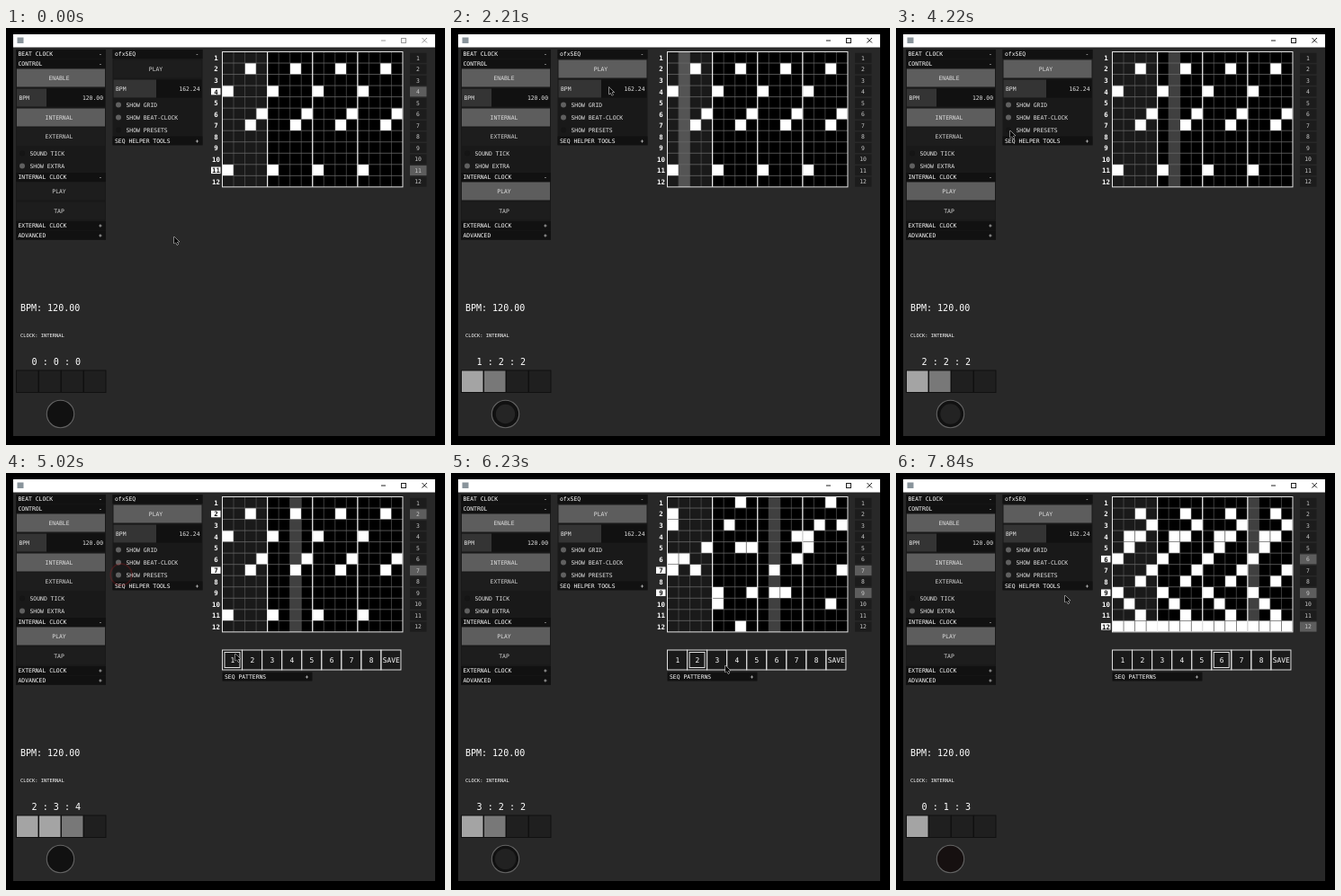
These frames come from a looping animation (488x464 px, 8000 ms). An HTML page with a canvas:

```html
<!DOCTYPE html>
<html lang="en">
<head>
<meta charset="utf-8">
<title>Beat clock sequencer</title>
<style>
html, body { margin: 0; width: 100%; height: 100%; overflow: hidden; background: #000; }
canvas { display: block; }
</style>
</head>
<body>
<canvas id="stage" width="488" height="464"></canvas>
<script>
const ctx = document.getElementById('stage').getContext('2d');
const LOOP = 8000, STEP = 201.03, BEAT = 500;
const START = 1555, PLAY_CLICK = 1500, PRESETS_CLICK = 4500;
const GRID = { x: 240.5, y: 26.5, cell: 12.53, cols: 16, rows: 12 };

// Each row lists its active columns as hexadecimal digits.
const PATTERNS = {
  1: ['', '26ae', '', '048c', '', '37bf', '26ae', '', '', '', '048c', ''],
  2: ['6e', '0', '05df', 'bc', '367c', '01b', '029f', '', '479a', '4e', '', '6'],
  6: ['', '26ae', '37bf', '12569ade', '159d', '048c', '37bf', '26ae', '048c', '159d', '26ae', '0123456789abcdef']
};
const SELECTIONS = [[0, 1], [5500, 2], [6700, 6]];
const CURSOR = [
  [0, 187, 232], [200, 187, 232], [1200, 162, 48], [1600, 161, 45], [1900, 161, 45],
  [3010, 238, 153], [4220, 127, 114], [4550, 127, 113], [5020, 255, 201],
  [5400, 273, 206], [5700, 273, 206], [6230, 305, 214], [6600, 361, 206],
  [6850, 361, 206], [7840, 188, 136], [8000, 188, 136]
];
const CLICKS = [[PLAY_CLICK, 162, 47], [PRESETS_CLICK, 128, 113], [5500, 273, 207], [6700, 361, 207]];

function box(x, y, w, h, fill) {
  ctx.fillStyle = fill;
  ctx.fillRect(x, y, w, h);
}
function frame(x, y, w, h, color, width = 1) {
  ctx.strokeStyle = color;
  ctx.lineWidth = width;
  ctx.strokeRect(x, y, w, h);
}
function line(x1, y1, x2, y2, color, width = 1) {
  ctx.strokeStyle = color;
  ctx.lineWidth = width;
  ctx.beginPath();
  ctx.moveTo(x1, y1);
  ctx.lineTo(x2, y2);
  ctx.stroke();
}
function disc(x, y, r, fill, stroke, width = 1) {
  ctx.beginPath();
  ctx.arc(x, y, r, 0, Math.PI * 2);
  if (fill) { ctx.fillStyle = fill; ctx.fill(); }
  if (stroke) { ctx.strokeStyle = stroke; ctx.lineWidth = width; ctx.stroke(); }
}
function text(label, x, y, { size = 6.4, color = '#e4e4e4', align = 'left', weight = '' } = {}) {
  ctx.font = `${weight} ${size}px "DejaVu Sans Mono", monospace`;
  ctx.fillStyle = color;
  ctx.textAlign = align;
  ctx.textBaseline = 'alphabetic';
  ctx.fillText(label, x, y + size * 0.365);
}

function header(label, x, y, sign, w = 100) {
  box(x, y, w, 10, '#111');
  text(label, x + 2.5, y + 5, { color: '#fff' });
  text(sign, x + w - 6, y + 5, { color: '#fff', align: 'center' });
}
function button(label, x, y, on, w = 98, h = 20) {
  box(x, y, w, h, on ? '#5d5d5d' : '#1d1d1d');
  text(label, x + w / 2 - 2, y + h / 2, { align: 'center', color: on ? '#ddd' : '#d0d0d0' });
}
function slider(value, x, y, fill) {
  box(x, y, 98, 20, '#111');
  box(x, y, fill, 20, '#343434');
  text('BPM', x + 2.5, y + 10);
  text(value, x + 96, y + 10, { align: 'right' });
}
function toggle(label, x, y, on) {
  disc(x, y, 3, on ? '#606060' : '#151515');
  text(label, x + 8.5, y);
}

function drawWindow(focused) {
  box(0, 0, 488, 464, '#000');
  box(8, 7, 469, 447, '#282828');
  box(8, 7, 469, 14.5, '#fff');
  box(12.5, 10.5, 7, 6.5, '#89949b');
  const color = focused ? '#222' : '#999';
  line(417, 14, 422, 14, color);
  frame(439.5, 11.5, 5, 5, color);
  line(462.5, 11, 468, 16.5, color);
  line(468, 11, 462.5, 16.5, color);
}

function drawClockPanel(playing) {
  box(11, 24, 100, 212, '#191919');
  header('BEAT CLOCK', 11, 24, '-');
  header('CONTROL', 11, 34.5, '-');
  button('ENABLE', 12, 45.5, true);
  slider('120.00', 12, 67.5, 33);
  button('INTERNAL', 12, 89.5, true);
  button('EXTERNAL', 12, 111, false);
  toggle('SOUND TICK', 18, 139.5, false);
  toggle('SHOW EXTRA', 18, 153.5, true);
  header('INTERNAL CLOCK', 11, 161, '-');
  button('PLAY', 12, 171.5, playing);
  button('TAP', 12, 193.5, false);
  header('EXTERNAL CLOCK', 11, 215, '+');
  header('ADVANCED', 11, 225.5, '+');
}

function drawSequencerPanel(playing, presets) {
  box(118.5, 24, 100, 106, '#191919');
  header('ofxSEQ', 118.5, 24, '-');
  button('PLAY', 119.5, 35.5, playing);
  slider('162.24', 119.5, 57.5, 47.5);
  toggle('SHOW GRID', 125, 85.5, true);
  toggle('SHOW BEAT-CLOCK', 125, 99.5, true);
  toggle('SHOW PRESETS', 125, 113.5, presets);
  header('SEQ HELPER TOOLS', 118.5, 120.5, '+');
}

function drawGrid(pattern, column, playing) {
  const { x, y, cell, cols, rows } = GRID, w = cols * cell, h = rows * cell;
  box(x, y, w, h, '#000');
  box(x, y, cell * 4, h, '#1a1a1a');
  if (playing) box(x + column * cell, y, cell, h, 'rgba(255,255,255,.25)');
  for (let c = 1; c < cols; c++) line(x + c * cell, y, x + c * cell, y + h, '#4c4c4c', 0.8);
  for (let r = 1; r < rows; r++) line(x, y + r * cell, x + w, y + r * cell, '#686868', 0.8);
  pattern.forEach((digits, r) => {
    for (const d of digits) {
      box(x + parseInt(d, 16) * cell + 0.3, y + r * cell + 0.3, cell - 0.6, cell - 0.6, '#fff');
    }
  });
  for (let c = 4; c < cols; c += 4) line(x + c * cell, y, x + c * cell, y + h, '#eee', 1.2);
  frame(x, y, w, h, '#e4e4e4');

  pattern.forEach((digits, r) => {
    const active = digits.includes(column.toString(16)), middle = y + (r + 0.5) * cell + 0.5;
    if (active) box(228, middle - 4, 10.5, 7.5, '#fff');
    text(r + 1, 233.5, middle, { size: 7.4, weight: 'bold', align: 'center', color: active ? '#111' : '#fff' });
    box(449, middle - 5.5, 18.5, 11, active ? '#5d5d5d' : '#1c1c1c');
    text(r + 1, 458, middle, { align: 'center', color: '#c8c8c8' });
  });
}

function drawPresets(selected) {
  box(240.5, 197, 198.5, 22, '#1a1a1a');
  for (let i = 0; i < 9; i++) {
    const x = 240.5 + i * 22.05;
    frame(x, 197, 22.05, 22, '#ddd');
    if (i + 1 === selected) frame(x + 2.5, 199.5, 17, 17, '#ddd');
    text(i < 8 ? i + 1 : 'SAVE', x + 11.3, 208, { size: 7.9, align: 'center', color: '#fff' });
  }
  header('SEQ PATTERNS', 240.5, 221.5, '+');
}

function drawBeat(elapsed, playing) {
  const beat = Math.floor(elapsed / BEAT), inBar = beat % 4, phase = elapsed % BEAT;
  const counter = playing
    ? [(Math.floor(beat / 4) + 1) % 4, inBar + 1, Math.floor(phase / 125) + 1]
    : [0, 0, 0];
  text('BPM: 120.00', 16, 311, { size: 10, color: '#fff' });
  text('CLOCK: INTERNAL', 16, 342.5, { size: 5.4, color: '#fff' });
  text(counter.join(' : '), 28.5, 371, { size: 10.1, color: '#fff' });

  for (let i = 0; i < 4; i++) {
    let fill = '#1f1f1f';
    if (playing && i <= inBar) fill = i && i === inBar ? '#787878' : '#a4a4a4';
    box(11 + i * 25, 381, 25, 24.5, fill);
    frame(11.5 + i * 25, 381, 24.5, 24.5, '#101010');
  }

  disc(60.5, 429.5, 15, '#111');
  if (playing) {
    const alpha = 0.42 * Math.exp(-phase / 100);
    const rgb = inBar ? '255,255,255' : '255,0,0';
    disc(60.5, 429.5, Math.min(15, 4 + phase * 0.043), `rgba(${rgb},${alpha})`);
  }
  disc(60.5, 429.5, 15.2, null, '#626262', 1.1);
}

function cursorAt(t) {
  const i = CURSOR.findIndex(key => key[0] > t);
  const [t0, x0, y0] = CURSOR[i - 1], [t1, x1, y1] = CURSOR[i];
  const u = (t - t0) / (t1 - t0), ease = u * u * (3 - 2 * u);
  return [x0 + (x1 - x0) * ease, y0 + (y1 - y0) * ease];
}

function drawPointer(t) {
  for (const [time, x, y] of CLICKS) {
    const age = t - time;
    if (age >= 0 && age < 650) {
      disc(x, y, 4 + age * 0.015, null, `rgba(225,25,30,${1 - age / 650})`, 1.6);
    }
  }
  ctx.save();
  ctx.translate(...cursorAt(t));
  ctx.beginPath();
  for (const [x, y] of [[0, 0], [0, 8], [1.8, 6.4], [3.1, 9.3], [4.4, 8.7], [3.1, 5.9], [5.6, 5.7]]) ctx.lineTo(x, y);
  ctx.closePath();
  ctx.fillStyle = '#080808';
  ctx.strokeStyle = '#e8e8e8';
  ctx.lineWidth = 1;
  ctx.stroke();
  ctx.fill();
  ctx.restore();
}

function draw(now) {
  const t = Math.floor((now % LOOP + 10) / STEP) * STEP;
  const playing = t >= START, elapsed = Math.max(0, t - START);
  const selected = SELECTIONS.filter(([time]) => t >= time).pop()[1];
  const presets = t >= PRESETS_CLICK;
  drawWindow(t >= 1400);
  drawClockPanel(playing);
  drawSequencerPanel(playing, presets);
  drawGrid(PATTERNS[selected], Math.floor(elapsed / BEAT) % GRID.cols, playing);
  if (presets) drawPresets(selected);
  drawBeat(elapsed, playing);
  drawPointer(t);
}

const origin = performance.now();
function tick() {
  draw(performance.now() - origin);
  requestAnimationFrame(tick);
}
tick();
</script>
</body>
</html>
```
